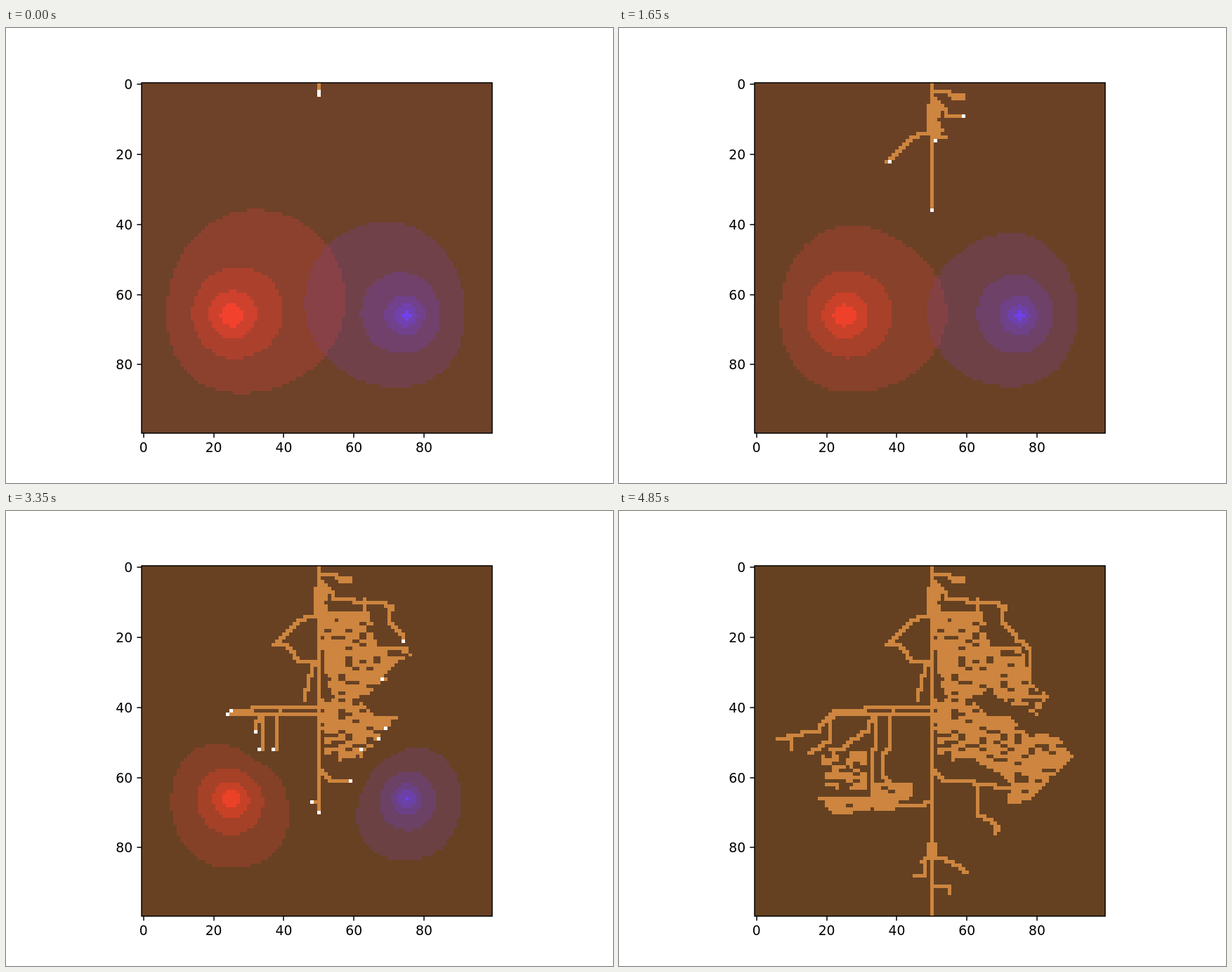
These frames come from a looping animation (864 px wide and 648 px high, 6150 ms). An HTML page with a canvas:

```html
<!DOCTYPE html>
<html lang="en">
<head>
<meta charset="utf-8">
<title>Root growth</title>
<style>
  html, body { margin: 0; width: 100%; height: 100%; overflow: hidden; background: #fff; }
  canvas, svg { position: absolute; left: 0; top: 0; width: 864px; height: 648px; }
  text { font: 18.75px "DejaVu Sans", sans-serif; fill: #000; }
  path { fill: none; stroke: #000; stroke-width: 1.5; }
</style>
</head>
<body>
<canvas id="stage" width="864" height="648"></canvas>
<svg id="axes" viewBox="0 0 864 648"></svg>
<script>
const N = 100, STEP = 50, LAST = 97, LOOP = 6150;
const LEFT = 193.32, TOP = 77.76, SIZE = 498.96, CELL = SIZE / N;

// Grids carry a border of one empty cell.
const W = N + 2, at = (x, y) => (y + 1) * W + x + 1;
const birth = new Float32Array(W * W).fill(Infinity);
const tips = Array.from({ length: LAST + 1 }, () => []);

const rnd = (x, y) => {
  const v = Math.sin(x * 12.9898 + y * 78.233) * 43758.5453;
  return v - Math.floor(v);
};

function grow(x, y, step, isTip) {
  const c = at(x, y);
  birth[c] = Math.min(birth[c], step);
  if (isTip && step >= 0 && step < LAST) tips[step].push(c);
}

// A tip walks in stairs along the way points, one cell per step.
function branch(step, x, y, ...points) {
  grow(x, y, step, true);
  for (let k = 0; k < points.length; k += 2) {
    const X = points[k], Y = points[k + 1];
    const w = Math.abs(X - x), h = Math.abs(Y - y);
    while (x !== X || y !== Y) {
      const rx = Math.abs(X - x), ry = Math.abs(Y - y);
      if (ry === 0 || rx * h > ry * w) x += Math.sign(X - x);
      else y += Math.sign(Y - y);
      grow(x, y, ++step, true);
    }
  }
}

function inside(px, py, poly) {
  let hit = false;
  for (let i = 0, j = poly.length - 2; i < poly.length; j = i, i += 2) {
    const [x1, y1, x2, y2] = [poly[i], poly[i + 1], poly[j], poly[j + 1]];
    if (y1 > py !== y2 > py && px < (x2 - x1) * (py - y1) / (y2 - y1) + x1) hit = !hit;
  }
  return hit;
}

// A tangle spreads from its first corner, one cell per step.
function thicket(density, start, ...poly) {
  for (let y = 0; y < N; y++)
    for (let x = 0; x < N; x++) {
      if (!inside(x + .5, y + .5, poly) || rnd(x >> 1, y) > density) continue;
      const away = Math.abs(x - poly[0]) + Math.abs(y - poly[1]);
      const step = Math.round(start + away + 2 * rnd(y, x));
      if (step < birth[at(x, y)]) grow(x, y, step, rnd(y * 3, x) < .3);
    }
}

branch(-3, 50,0, 50,99);
branch(-1, 50,1, 55,2, 59,3, 56,4);
branch(4, 49,6, 49,14, 46,14, 37,22, 41,22, 44,27, 49,27, 46,38);
branch(20, 51,4, 54,8, 60,9, 69,10, 69,11);
branch(50, 69,11, 71,11, 70,15, 74,20, 77,22, 78,31);
branch(37, 63,9, 63,13, 56,14);
branch(24, 50,13, 54,15);

branch(41, 50,40, 31,40, 22,41, 18,46, 13,47, 6,49);
branch(40, 50,41, 42,42, 22,42, 21,49, 15,53);
branch(91, 10,48, 10,52);
branch(54, 39,41, 38,51, 36,53, 36,59, 39,62);
branch(56, 34,42, 34,51, 33,63);
branch(62, 33,43, 32,46, 25,51, 21,52);

branch(38, 50,39, 55,39, 55,43);
branch(41, 51,42, 53,46);
branch(54, 50,57, 54,61, 62,61, 73,63, 73,65, 75,66);
branch(74, 63,62, 63,70, 67,72, 69,74, 68,76);

branch(65, 50,67, 48,67, 32,68, 22,70);
branch(75, 40,67, 25,66);
branch(76, 51,79, 51,82, 56,84, 60,87);
branch(76, 49,79, 49,82, 47,84);
branch(87, 48,84, 48,87, 45,88);
branch(90, 51,91, 55,91, 55,93);

thicket(.97, 17, 49,6, 53,6, 53,14, 49,14);
thicket(.84, 30, 51,13, 65,13, 67,23, 76,23, 79,34, 84,37, 81,43, 66,36, 56,40, 53,34, 51,20);
thicket(.78, 40, 51,38, 61,37, 66,43, 73,43, 78,48, 86,48, 91,55, 78,68, 72,68, 73,62, 62,55, 52,56);
thicket(.75, 72, 27,53, 32,53, 32,64, 27,64);
thicket(.62, 80, 27,54, 27,64, 20,63, 19,53);
thicket(.96, 74, 40,66, 40,70, 22,70, 18,66);
thicket(.85, 82, 33,62, 45,62, 45,67, 33,67);

// Nutrients diffuse from a fixed source and are absorbed by roots and edges.
function relax({ u, source }, step, rounds) {
  for (let c = 0; c < u.length; c++) if (birth[c] <= step) u[c] = 0;
  if (birth[source] <= step) return u.fill(0);
  u[source] = 1;
  for (let r = 0; r < rounds; r++)
    for (let y = 0; y < N; y++)
      for (let c = at(0, y), end = c + N; c < end; c++)
        if (birth[c] > step && c !== source)
          u[c] += 1.92 * ((u[c - 1] + u[c + 1] + u[c - W] + u[c + W]) / 4 - u[c]);
}

// Each ring has half the radius of the one around it; wide rings lean to the middle.
function makeField(x, y, radius, rings) {
  const field = { u: new Float32Array(W * W), source: at(x, y), levels: [] };
  relax(field, -9, 400);
  for (let k = 0, r = radius; k < rings; k++, r /= 2) {
    const lean = r * r / 96, cx = x + lean * Math.sign(N / 2 - x);
    const row = Math.round(y - lean * .6);
    const rim = side => field.u[at(Math.round(cx + side * r), row)];
    field.levels.push(.975 * (rim(-1) + rim(1)) / 2);
  }
  return field;
}

const red = makeField(25, 66, 25, 4);
const blue = makeField(75, 66, 22, 5);
const band = ({ u, levels }, c) => levels.filter(v => u[c] >= v).length;

function soil(c, fade) {
  const r = band(red, c), b = band(blue, c), both = r && b ? 7 : 0;
  return [
    101 + 9 * fade + 29 * r + 1.3 * r * (r - 1) + (b ? 3 : 0) - both,
    65,
    33 + 8 * fade + 33 * b + (b > 4 ? 30 : 0) + (r ? 4 : 0) - both,
  ];
}

const frames = [];
function makeFrame(step) {
  relax(red, step, 45);
  relax(blue, step, 45);
  const image = new ImageData(N, N);
  for (let y = 0; y < N; y++)
    for (let x = 0; x < N; x++) {
      const c = at(x, y);
      const rgb = tips[step].includes(c) ? [255, 255, 255]
        : birth[c] <= step ? [205, 133, 63]
        : soil(c, 1 - step / LAST);
      image.data.set([...rgb, 255], 4 * (y * N + x));
    }
  const grid = document.createElement('canvas');
  grid.width = grid.height = N;
  grid.getContext('2d').putImageData(image, 0, 0);
  return grid;
}

function drawAxes() {
  const right = Math.round(LEFT + SIZE), bottom = Math.round(TOP + SIZE);
  const left = Math.round(LEFT), top = Math.round(TOP);
  let lines = `M${left} ${top}H${right}V${bottom}H${left}Z`, labels = '';
  for (let v = 0; v < N; v += 20) {
    const x = LEFT + (v + .5) * CELL, y = TOP + (v + .5) * CELL;
    lines += `M${Math.round(x)} ${bottom}v6.6M${left} ${Math.round(y)}h-6.6`;
    labels += `<text x="${x}" y="604.2" text-anchor="middle">${v}</text>` +
      `<text x="180.2" y="${y + 7}" text-anchor="end">${v}</text>`;
  }
  document.getElementById('axes').innerHTML = `<path d="${lines}"/>${labels}`;
}

const ctx = document.getElementById('stage').getContext('2d');
ctx.imageSmoothingEnabled = false;
let shown = -1;

function show(step) {
  if (step === shown) return;
  while (frames.length <= step) frames.push(makeFrame(frames.length));
  ctx.drawImage(frames[step], LEFT, TOP, SIZE, SIZE);
  shown = step;
}

drawAxes();
show(0);
const begin = performance.now();
function tick() {
  const time = (performance.now() - begin) % LOOP;
  show(Math.min(LAST, Math.floor(time / STEP)));
  requestAnimationFrame(tick);
}
requestAnimationFrame(tick);
</script>
</body>
</html>
```
